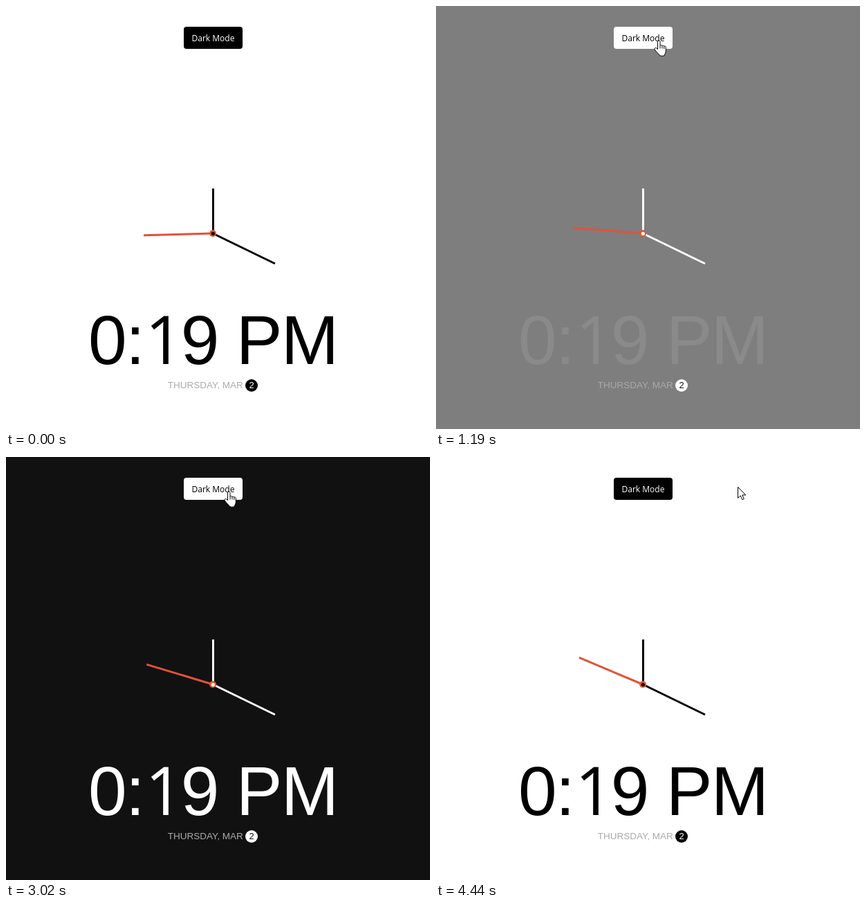
An HTML page for the animation above (4.49 s loop, 613 by 612 pixels).

```html
<!DOCTYPE html>
<html lang="en">
<head>
<meta charset="utf-8">
<title>Theme clock</title>
<style>
  html, body { margin: 0; width: 100%; height: 100%; overflow: hidden; background: #fff; }
  svg { display: block; width: 613px; height: 612px; }
  text { font-family: "Liberation Sans", Arial, sans-serif; }
  .label { font: 12px "Open Sans", "Noto Sans", sans-serif; }
  .one { font: 97px "Open Sans", "Noto Sans", sans-serif; }
  .cursor { fill: #fff; stroke: #000; stroke-width: 1; stroke-linejoin: round; }
</style>
</head>
<body>
<svg viewBox="0 0 613 612">
  <rect id="page" width="613" height="612"/>

  <rect id="button" x="257" y="30" width="85" height="32" rx="4"/>
  <text id="label" class="label" x="299.5" y="51" text-anchor="middle">Dark Mode</text>

  <rect id="hour" x="298" y="264" width="3" height="65"/>
  <rect id="minute" x="297.5" y="229" width="3" height="100"/>
  <rect id="second" x="297.5" y="229" width="3" height="100" fill="#e2523a"/>
  <circle cx="299" cy="329" r="5" fill="#e2562f"/>
  <circle id="pin" cx="299.3" cy="329.3" r="2.6"/>

  <!-- the "1" has no foot, unlike the other font's digit -->
  <text id="time" x="119" y="518" font-size="100" letter-spacing="-1.7">0:<tspan class="one" dx="2">1</tspan><tspan dx="-2">9 PM</tspan></text>
  <text x="233.7" y="553" font-size="13.5" fill="#aaa">THURSDAY, MAR</text>
  <circle id="badge" cx="355" cy="549" r="9"/>
  <text id="day" x="355" y="553" font-size="13" text-anchor="middle">2</text>

  <path id="arrow" class="cursor" d="M.5 .5V16.5L4.2 13 6.8 18.7 9.3 17.6 6.8 12H11.8Z"/>
  <g id="hand" class="cursor">
    <path d="M5.5 13.5V2.5a1.8 1.8 0 0 1 3.5 0V8.4a1.6 1.6 0 0 1 3 .5a1.5 1.5 0 0 1 2.8 .7a1.4 1.4 0 0 1 2.5 1V16c0 3-1.6 4-2 6.7q-3.3 1.5-6.8 0C7.6 20.5 3.8 18 1.2 14C0 12.3 2.4 10.7 4 12.1Z"/>
    <path fill="none" d="M9 8.4V12.5M12 9V12.5M14.8 9.7V13"/>
  </g>
</svg>
<script>
const LOOP = 4490;
const DARK_AT = 720, LIGHT_AT = 3420;
const TICKS = [1010, 2000, 3020, 3990];
// [time, progress] through each colour fade
const TO_DARK = [[DARK_AT, 0], [1020, .357], [1190, .687], [1380, 1]];
const TO_LIGHT = [[LIGHT_AT, 0], [3670, .33], [3890, .758], [4050, 1]];

const el = {};
document.querySelectorAll("[id]").forEach(node => el[node.id] = node);

const mix = (a, b, k) => a + (b - a) * k;

function gray(from, to, k) {
  const v = Math.round(mix(from, to, k));
  return `rgb(${v},${v},${v})`;
}

function fill(color, ...names) {
  names.forEach(name => el[name].setAttribute("fill", color));
}

function along(points, t) {
  if (t <= points[0][0]) return points[0][1];
  for (let i = 1; i < points.length; i++) {
    const [t0, a] = points[i - 1], [t1, b] = points[i];
    if (t < t1) return mix(a, b, (t - t0) / (t1 - t0));
  }
  return 1;
}

// cubic-bezier(.42, 0, 1, 1)
function easeIn(x) {
  let lo = 0, hi = 1;
  for (let i = 0; i < 24; i++) {
    const s = (lo + hi) / 2, r = 1 - s;
    if (1.26 * r * r * s + 3 * r * s * s + s * s * s < x) lo = s; else hi = s;
  }
  return 3 * (1 - lo) * lo * lo + lo ** 3;
}

function rotate(name, value) {
  el[name].setAttribute("transform", `rotate(${value * 360 / 59} 299 329)`);
}

function place(name, x, y) {
  el[name].setAttribute("visibility", x === undefined ? "hidden" : "visible");
  if (x !== undefined) el[name].setAttribute("transform", `translate(${x} ${y})`);
}

function drawCursor(t) {
  let x, y;
  if (t >= 4440) [x, y] = [436, 43];
  else if (t >= 4390) [x, y] = [382, 46];
  else if (t >= 50) {
    const k = Math.min(10, Math.floor((t - 50) / 52)) / 10;
    const left = (1 - k) ** 2;
    x = Math.round(mix(321, 602, left));
    y = Math.round(mix(49, 169, left));
  }
  const over = x < 342;
  place("hand", over ? x - 6 : undefined, y);
  place("arrow", over ? undefined : x, y);
}

function draw(t) {
  const dark = t >= DARK_AT && t < LIGHT_AT;
  const k = easeIn(along(TO_DARK, t)) - easeIn(along(TO_LIGHT, t));
  const page = gray(255, 17, k), ink = gray(0, 255, k);

  fill(page, "page");
  fill(ink, "time");
  fill(dark ? "#fff" : "#000", "button", "hour", "minute", "pin");
  fill(dark ? "#000" : "#fff", "label");
  fill(dark ? "#fff" : ink, "badge");
  fill(dark ? "#111" : page, "day");

  rotate("minute", 19);
  rotate("second", 44 + TICKS.filter(at => t >= at).length);
  drawCursor(t);
}

const start = performance.now();
function frame() {
  draw((performance.now() - start) % LOOP);
  requestAnimationFrame(frame);
}
draw(0);
requestAnimationFrame(frame);
</script>
</body>
</html>
```
